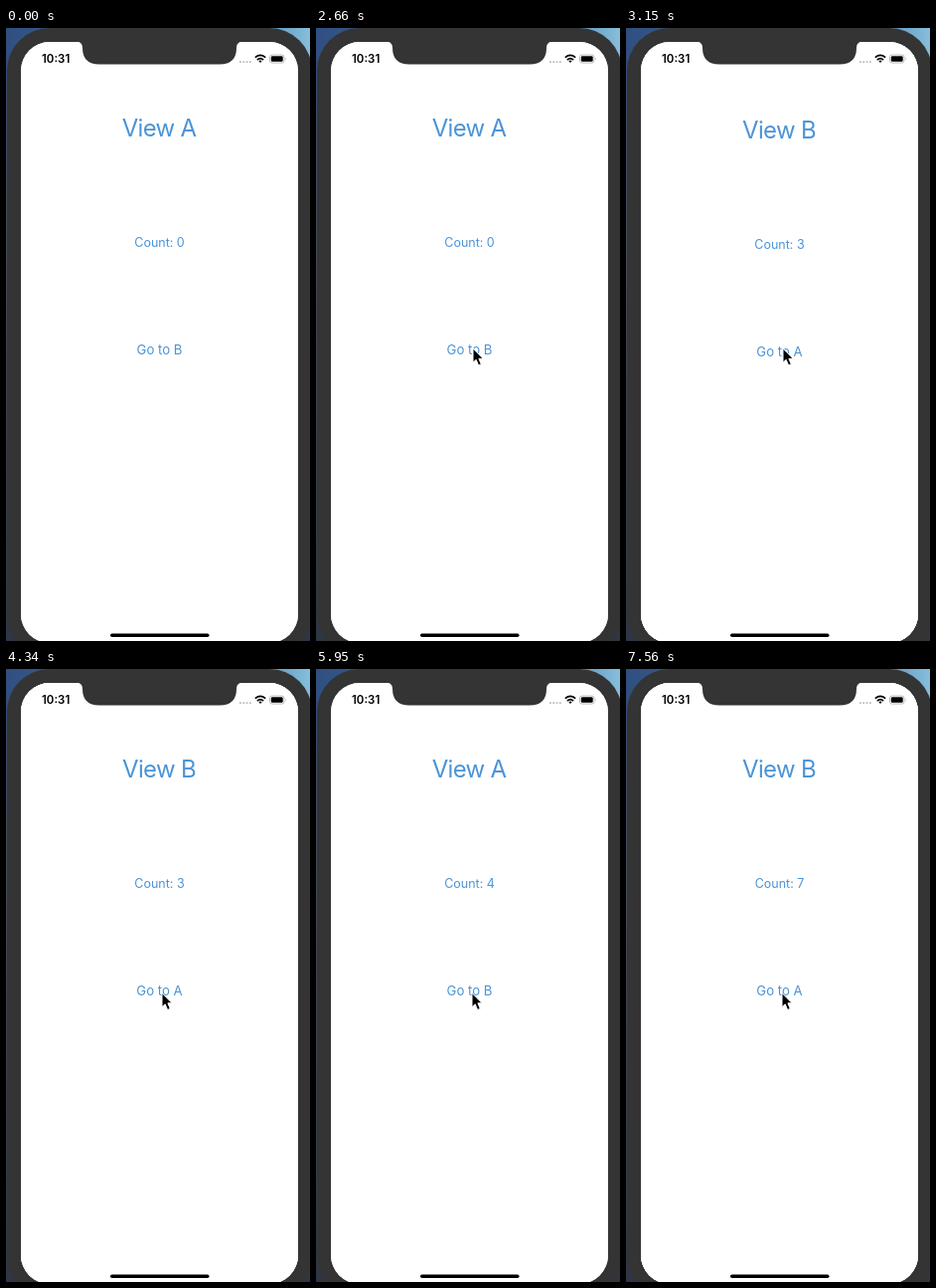
An HTML page for the animation above (8000 ms loop, 306 by 616 pixels).

```html
<!DOCTYPE html>
<html lang="en">
<head>
<meta charset="utf-8">
<title>Modal views</title>
<style>
  html, body { margin: 0; width: 100%; height: 100%; overflow: hidden; background: #343434; }
  svg { display: block; width: 306px; height: 616px; }
  text { font-family: Inter, Roboto, sans-serif; }
  .view { fill: #4a94d8; text-anchor: middle; }
  .title { font-size: 24px; letter-spacing: -.7px; }
  .count { font-size: 12.5px; }
  .link { font-size: 13.2px; }
</style>
</head>
<body>
<svg viewBox="0 0 306 616">
  <defs>
    <clipPath id="screen"><rect x="15" y="14" width="279" height="604" rx="29"/></clipPath>
    <linearGradient id="wall" x2="1" y2="0">
      <stop stop-color="#2f4f80"/><stop offset=".8" stop-color="#4d86b4"/><stop offset="1" stop-color="#86bedb"/>
    </linearGradient>
    <linearGradient id="edge" x2="0" y2="1">
      <stop stop-color="#35507a"/><stop offset=".4" stop-color="#454a55"/><stop offset="1" stop-color="#2d3642"/>
    </linearGradient>
  </defs>

  <rect width="306" height="616" fill="url(#edge)"/>
  <rect width="306" height="45" fill="url(#wall)"/>
  <rect x="1" y="0" width="307" height="632" rx="43" fill="#343434"/>

  <g clip-path="url(#screen)">
    <rect x="15" y="14" width="279" height="604" fill="#fff"/>
    <g id="a" class="view"></g>
    <g id="b" class="view"></g>
  </g>

  <path d="M71 13.5Q77 14 77 20Q77 36.500 94 36.500H215Q232 36.500 232 20Q232 14 238 13.500Z" fill="#343434"/>
  <text x="36" y="35" font-size="11.500" font-weight="600">10:31</text>
  <path d="M235 34.200H247" stroke="#bbb" stroke-width="1.800" stroke-dasharray="1.800 1.500"/>
  <g fill="none" stroke="#000" stroke-width="1.700">
    <path d="M250.800 29.700Q256 25.200 261.200 29.700M252.900 32Q256 29.400 259.100 32"/>
    <path d="M254.300 33.100Q256 31.900 257.700 33.100L256 35Z" fill="#000" stroke="none"/>
  </g>
  <rect x="265.500" y="27" width="14.500" height="8" rx="2.200" fill="none" stroke="#aaa" stroke-width=".8"/>
  <rect x="266.800" y="28.300" width="11.900" height="5.400" rx="1.200"/>
  <path d="M281.500 29.500Q283 31 281.500 32.500Z" fill="#aaa"/>
  <rect x="105" y="608.500" width="99.500" height="3.400" rx="1.700"/>

  <path id="cursor" d="M0 0V14.200L3.200 11.300 5.600 17 8.300 15.900 5.900 10.300H10.200Z" stroke="#fff" stroke-width="1" stroke-linejoin="round"/>
</svg>
<script>
const LOOP = 8000, STEP = 70, HEIGHT = 604, OMEGA = Math.sqrt(1000 / 3);
const SHOW_1 = 2723, HIDE = 4802, SHOW_2 = 6655;
const $ = id => document.getElementById(id);

const view = (name, other) => `
  <rect x="15" y="14" width="279" height="${HEIGHT}" fill="#fff"/>
  <text class="title" x="154" y="109">View ${name}</text>
  <text class="count" x="154.500" y="220"></text>
  <text class="link" x="154.500" y="327.500">Go to ${other}</text>`;
$('a').innerHTML = view('A', 'B');
$('b').innerHTML = view('B', 'A');
const counts = document.querySelectorAll('.count');

// Critically damped spring: the share of the way still to go.
function rest(ms) {
  const x = OMEGA * Math.max(0, ms) / 1000;
  return (1 + x) * Math.exp(-x);
}

function offset(t) {
  if (t >= SHOW_2) return HEIGHT * rest(t - SHOW_2);
  if (t >= HIDE) return HEIGHT * (1 - rest(t - HIDE));
  return HEIGHT * rest(t - SHOW_1);
}

// Pointer path: time, x, y
const path = [
  [490, 320, 60], [560, 270, 130], [630, 214, 226], [700, 170, 300],
  [770, 146, 326], [840, 141, 328], [910, 150, 325], [980, 157, 323],
  [1120, 157, 323], [1260, 158, 322], [3780, 158, 322],
  [3990, 156, 324], [4270, 156, 324], [4340, 157, 325.5]
];

function pointer(t) {
  const i = path.findIndex(p => p[0] > t);
  if (i < 0) return path[path.length - 1].slice(1);
  if (i === 0) return path[0].slice(1);
  const [t0, x0, y0] = path[i - 1], [t1, x1, y1] = path[i];
  const k = (t - t0) / (t1 - t0);
  return [x0 + (x1 - x0) * k, y0 + (y1 - y0) * k];
}

function draw(now) {
  const t = Math.min(7560, Math.floor(now % LOOP / STEP) * STEP);
  const count = t < SHOW_1 ? 0 : t < HIDE ? 3 : t < SHOW_2 ? 4 : 7;
  counts.forEach(c => c.textContent = 'Count: ' + count);
  $('b').setAttribute('transform', `translate(0 ${offset(t).toFixed(2)})`);
  $('cursor').setAttribute('transform', `translate(${pointer(t)})`);
  requestAnimationFrame(draw);
}
requestAnimationFrame(draw);
</script>
</body>
</html>
```
